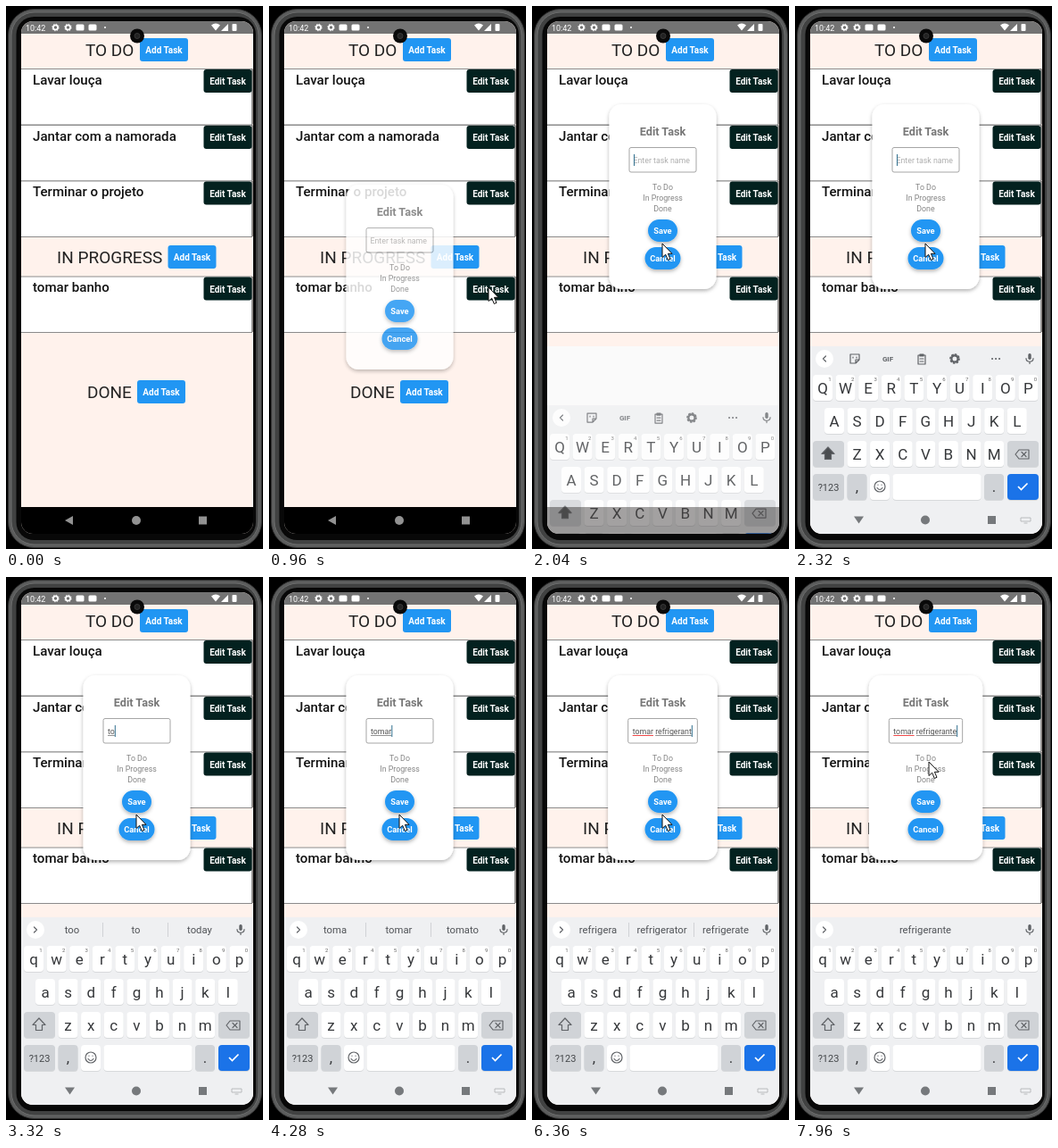
Recreate the animation shown at these times as an HTML page. Size 288 px wide and 608 px high, loop 8 s.

```html
<!DOCTYPE html>
<html lang="pt">
<head>
<meta charset="utf-8">
<title>Task board</title>
<style>
html, body { margin: 0; width: 100%; height: 100%; overflow: hidden; background: #000; }
svg { display: block; width: 288px; height: 608px; font-family: Roboto, Inter, sans-serif; }
.mid { text-anchor: middle; }
.head { font-size: 19px; fill: #222; }
.card { font-size: 15.1px; font-weight: 500; fill: #111; }
.btn { font-size: 10px; font-weight: 700; fill: #fff; }
.pill { font-size: 9.3px; font-weight: 700; fill: #fff; }
.small { font-size: 8.8px; fill: #858585; }
.key { font-size: 17px; fill: #36383b; }
.num { font-size: 6px; fill: #666; }
.word { font-size: 11.3px; fill: #505357; }
.line { fill: none; stroke: #606367; stroke-width: 1.2; stroke-linejoin: round; stroke-linecap: round; }
</style>
</head>
<body>
<svg viewBox="0 0 288 608" xml:space="default">
  <defs>
    <clipPath id="screenClip"><rect x="17" y="17" width="260" height="574" rx="13"/></clipPath>
    <filter id="shade" x="-30%" y="-30%" width="160%" height="170%">
      <feDropShadow dx="0" dy="2" stdDeviation="2" flood-opacity=".3"/>
    </filter>
  </defs>
  <rect x="2.5" y="3.5" width="284" height="603" rx="29" fill="#5b5c5c" stroke="#2c2c2c"/>
  <rect x="6" y="7" width="277" height="596" rx="26" fill="#414242" stroke="#6d6e6e"/>
  <rect x="11.5" y="12" width="268.5" height="586" rx="20" fill="#080808"/>
  <g clip-path="url(#screenClip)">
    <rect x="17" y="17" width="260" height="574" fill="#fff2ec"/>
    <g id="board"></g>
    <rect x="17" y="17" width="260" height="14" fill="#737373"/>
    <g id="status" fill="#fff"></g>
    <rect id="blank" x="17" y="381" width="260" height="180" fill="#fafafa"/>
    <g id="modal">
      <rect id="panel" y="200" height="207" rx="14" fill="#fff" filter="url(#shade)"/>
      <text class="mid" x="146.5" y="235" font-size="12.7" font-weight="700" fill="#777">Edit Task</text>
      <rect id="field" y="248.5" height="27.5" rx="2" fill="#fff" stroke="#a5a5a5"/>
      <text id="hint" class="small" x="113.5" y="265.5" style="fill:#adadad">Enter task name</text>
      <text id="entry" class="small" y="265.5" style="fill:#555"></text>
      <path id="typo" stroke="#ef4a4a" stroke-width="1"/>
      <path id="compose" stroke="#777" stroke-width=".8"/>
      <rect id="caret" y="256" width="1" height="13" fill="#31708f"/>
      <text class="small mid" x="146.5" y="296">To Do</text>
      <text class="small mid" x="146.5" y="308">In Progress</text>
      <text class="small mid" x="146.5" y="320">Done</text>
      <g filter="url(#shade)" fill="#2196f3">
        <rect x="130" y="329" width="33" height="25" rx="12.5"/>
        <rect x="126.500" y="360" width="40" height="25" rx="12.5"/>
      </g>
      <text class="pill mid" x="146.5" y="345">Save</text>
      <text class="pill mid" x="146.5" y="376">Cancel</text>
    </g>
    <g id="keyboard">
      <rect x="17" y="381" width="260" height="211" fill="#eff0f2"/>
      <g id="keys"></g>
      <circle cx="33" cy="395" r="10" fill="#fff"/>
      <path id="chevron" class="line"/>
      <g id="tools" class="line">
        <path d="M62 390h10v6l-4 4h-6zM68 400v-4h4M65 393v1M69 393v1"/>
        <path d="M138 391h8v10h-8zM140 390h4v2h-4zM140 395h4M140 398h4"/>
        <circle cx="179" cy="395" r="3.6" stroke-width="2.2"/>
        <circle cx="179" cy="395" r="5" stroke-dasharray="1.4 2.5" stroke-width="1.6"/>
        <path d="M221 395h.1M225 395h.1M229 395h.1" stroke-width="2"/>
        <text class="mid" x="104" y="398" font-size="8" font-weight="700" fill="#606367" stroke="none">GIF</text>
      </g>
      <g id="words"></g>
      <rect x="261.300" y="389" width="3.400" height="7" rx="1.700" fill="#606367"/>
      <path class="line" d="M259 394.500c0 5 8 5 8 0M263 398.500v2"/>
      <g fill="#76797c">
        <path d="M66 571.500h11l-5.500 8z"/><circle cx="146" cy="575.500" r="5"/>
        <rect x="216" y="571" width="9" height="9"/>
      </g>
      <path d="M253 573h11v4h-11zM256.500 579h4" fill="none" stroke="#b9bbbd"/>
    </g>
    <g id="nav">
      <rect x="17" y="561" width="260" height="31"/>
      <g id="navIcons" fill="#929292">
        <path d="M75 571v10l-9-5z"/><circle cx="146" cy="576" r="5"/>
        <rect x="216" y="571.500" width="9" height="9"/>
      </g>
    </g>
  </g>
  <circle cx="147" cy="33.500" r="8" fill="#090909"/>
  <circle cx="147" cy="33.500" r="3" fill="#222" stroke="#383838"/>
  <path id="pointer" d="M0 0V15.500L3.700 12.200L6.300 18.500L9 17.300L6.400 11.300H11Z" fill="#fff" stroke="#111"/>
</svg>
<script>
const $ = id => document.getElementById(id);
const text = (cls, x, y, s) => `<text class="${cls}" x="${x}" y="${y}">${s}</text>`;
const box = (x, y, w, h, fill, r = 0) =>
  `<rect x="${x}" y="${y}" width="${w}" height="${h}" rx="${r}" fill="${fill}"/>`;
const show = (id, on) => $(id).style.display = on ? '' : 'none';
const clamp = v => Math.max(0, Math.min(1, v));
const latest = (list, t) => list.filter(e => e[0] <= t).pop();

const header = (label, x, buttonX, y) => text('head', x, y + 7, label) +
  box(buttonX, y - 13, 54, 26, '#2196f3', 3) + text('btn mid', buttonX + 27, y + 3.5, 'Add Task');
const card = (label, y) => box(17, y, 259, 62.5, '#fff') +
  `<path d="M17 ${y}H276M17 ${y + 62.5}H276" stroke="#8b8b8b"/>` +
  `<path d="M276 ${y}v62" stroke="#222"/>` + text('card', 30, y + 17, label) +
  box(221.5, y + .5, 54, 26, '#03211f', 3) + text('btn mid', 248.5, y + 17.5, 'Edit Task');

$('board').innerHTML =
  header('TO DO', 89, 150, 49) + card('Lavar louça', 70.5) +
  card('Jantar com a namorada', 133.5) + card('Terminar o projeto', 196) +
  header('IN PROGRESS', 57, 181.5, 281) + card('tomar banho', 303) +
  header('DONE', 91, 147, 432);

const gear = x => `<circle cx="${x}" cy="24" r="2.6" fill="none" stroke="#fff" stroke-width="1.8"/>
  <circle cx="${x}" cy="24" r="3.8" fill="none" stroke="#fff" stroke-dasharray="1.2 1.800"/>`;
$('status').innerHTML = '<text x="22" y="27.500" font-size="9">10:42</text>' + gear(55.5) + gear(69.5) +
  box(78.5, 20.5, 9, 7, '#fff', 1.5) + box(92.5, 20.5, 9, 7, '#fff', 1.5) +
  '<circle cx="111" cy="24" r="1"/><path d="M230 21.500q5-4 10 0l-5 6zM249 20v8h-8z"/>' +
  box(253.5, 20, 5, 8, '#fff', 1);

const STEP = 25.6, LETTERS = ['qwertyuiop', 'asdfghjkl', 'zxcvbnm'];
const gray = '#d0d3d7';
const cap = (x, y, w, fill = '#fff') =>
  box(x, y + 1, w, 29, '#d7d9db', 4) + box(x, y, w, 29, fill, 4);

function drawKeys(upper) {
  const rows = LETTERS.map((row, r) => [...row].map((ch, i) => {
    const x = [31, 44, 69.5][r] + i * STEP, y = 413 + r * 37;
    return cap(x - 11, y, 22) + text('key mid', x, y + 20.5, upper ? ch.toUpperCase() : ch) +
      (r ? '' : text('num mid', x + 8, y + 7, (i + 1) % 10));
  }).join('')).join('');
  const shift = `<path d="M37 494l7 7.500h-3.500v6h-7v-6h-3.500z" class="line" style="fill:${upper ? '#4a4d50' : 'none'}"/>`;
  return rows + cap(20, 487, 35, gray) + shift + cap(238, 487, 35, gray) +
    '<path class="line" d="M247 502l4-5h11v10h-11zM254 499.500l5 5M259 499.500l-5 5"/>' +
    cap(20, 524, 35, gray) + '<text class="mid" x="37.500" y="542.500" font-size="11" fill="#44474a">?123</text>' +
    cap(58.5, 524, 22, gray) + text('key mid', 69.5, 544, ',') +
    cap(84, 524, 22) + '<circle class="line" cx="95" cy="538" r="6"/><path class="line" d="M93 536v.2M97 536v.2M92 539.500q3 4 6 0"/>' +
    cap(109.5, 524, 99) + cap(212, 524, 22, gray) + text('key mid', 223, 544, '.') +
    cap(238, 524, 35, '#1b73e8') + '<path d="M250 538l3.500 3.500 7-7" fill="none" stroke="#fff" stroke-width="1.700"/>';
}

const PHRASE = 'tomar refrigerante';
const KEY_TIMES = [2680, 3000, 3400, 3800, 4200, 4320, 4480, 4720, 5240, 5360, 5520, 5720, 5920, 6120, 6200, 6280, 6360, 6520];
const SUGGESTIONS = [
  [0, []], [2760, ['the', 't', 'to']], [3080, ['too', 'to', 'today']],
  [3480, ['tom', 'tomorrow', 'Tom']], [3880, ['toma', 'tomar', 'tomato']],
  [4360, ['and', 'the', 'to']], [4560, ['r', 'are', 'to']], [4760, ['re', 'red', 'really']],
  [5280, ['ref', 'refund', 'refer']], [5520, ['refri', 'refrigerator', 'refried']],
  [5720, ['refrig', 'refrigerator', 'refrigerate']], [5960, ['refrige', 'refrigerator', 'refrigerate']],
  [6240, ['refrigera', 'refrigerator', 'refrigerate']], [6640, ['refrigerante']]
];
// time, x, y of the pointer tip
const POINTER = [[40, 270, 424], [560, 246, 315], [1240, 246, 315], [1600, 157, 299],
  [1720, 146, 266], [7800, 146, 266], [7960, 150, 207], [8000, 150, 207]];

function pointerAt(t) {
  const i = Math.max(1, POINTER.findIndex(p => p[0] >= t));
  const [t0, x0, y0] = POINTER[i - 1], [t1, x1, y1] = POINTER[i];
  const k = clamp((t - t0) / (t1 - t0));
  return [x0 + (x1 - x0) * k, y0 + (y1 - y0) * k];
}

const OPEN = 760, FOCUS = 1945;
let drawn = '';

function drawEntry(t) {
  const count = KEY_TIMES.filter(k => k <= t).length;
  const entry = $('entry');
  entry.textContent = PHRASE.slice(0, count);
  const width = count ? entry.getComputedTextLength() : 0;
  const fieldW = Math.max(75, width + 11.5), left = 146.5 - fieldW / 2;
  const start = left + 5, end = start + width;
  $('field').setAttribute('x', left);
  $('field').setAttribute('width', fieldW);
  $('panel').setAttribute('x', left - 22.5);
  $('panel').setAttribute('width', fieldW + 45);
  entry.setAttribute('x', start);
  show('hint', !count);
  const firstEnd = count > 5 ? start + entry.getSubStringLength(0, 5) : end;
  const wordStart = count > 6 ? start + entry.getSubStringLength(0, 6) : count > 5 ? end : start;
  $('compose').setAttribute('d', `M${wordStart} 267.500H${end}`);
  $('typo').setAttribute('d', count > 5 ? `M${start} 267.500H${firstEnd}` : '');
  $('caret').setAttribute('x', end);
  const since = t - (count ? KEY_TIMES[count - 1] : FOCUS);
  show('caret', t >= FOCUS && since % 1000 < 500);
  return count;
}

function drawKeyboard(t, count) {
  const words = latest(SUGGESTIONS, t)[1], upper = !count;
  const state = upper + words.join();
  if (state !== drawn) {
    drawn = state;
    $('keys').innerHTML = drawKeys(upper);
    const xs = words.length > 1 ? [74, 145.5, 217] : [146];
    $('words').innerHTML = words.map((w, i) => text('word mid', xs[i], 399, w)).join('') +
      (words.length > 1 ? '<path d="M108.500 387v16M181.500 387v16" stroke="#d0d2d5"/>' : '');
    show('tools', !words.length);
    $('chevron').setAttribute('d', words.length ? 'M31.500 392l3 3-3 3' : 'M34.500 392l-3 3 3 3');
  }
  const left = 1 - clamp((t - FOCUS) / 300);
  $('keyboard').setAttribute('transform', `translate(0 ${210 * left ** 3})`);
  $('keyboard').style.opacity = clamp((t - FOCUS) / 125);
  $('nav').style.opacity = t < FOCUS ? 1 : clamp(1 - (t - FOCUS) / 150);
  show('navIcons', t < FOCUS);
  show('keyboard', t >= FOCUS);
  show('blank', t >= FOCUS);
}

function render(t) {
  const modal = $('modal');
  show('modal', t >= OPEN);
  modal.style.opacity = clamp((t - OPEN) / 240);
  modal.setAttribute('transform', `translate(0 ${t < FOCUS ? 0 : -90})`);
  drawKeyboard(t, drawEntry(t));
  show('pointer', t >= 40);
  $('pointer').setAttribute('transform', `translate(${pointerAt(t)})`);
}

const begin = performance.now();
function tick() {
  render((performance.now() - begin) % 8000);
  requestAnimationFrame(tick);
}
tick();
</script>
</body>
</html>
```
